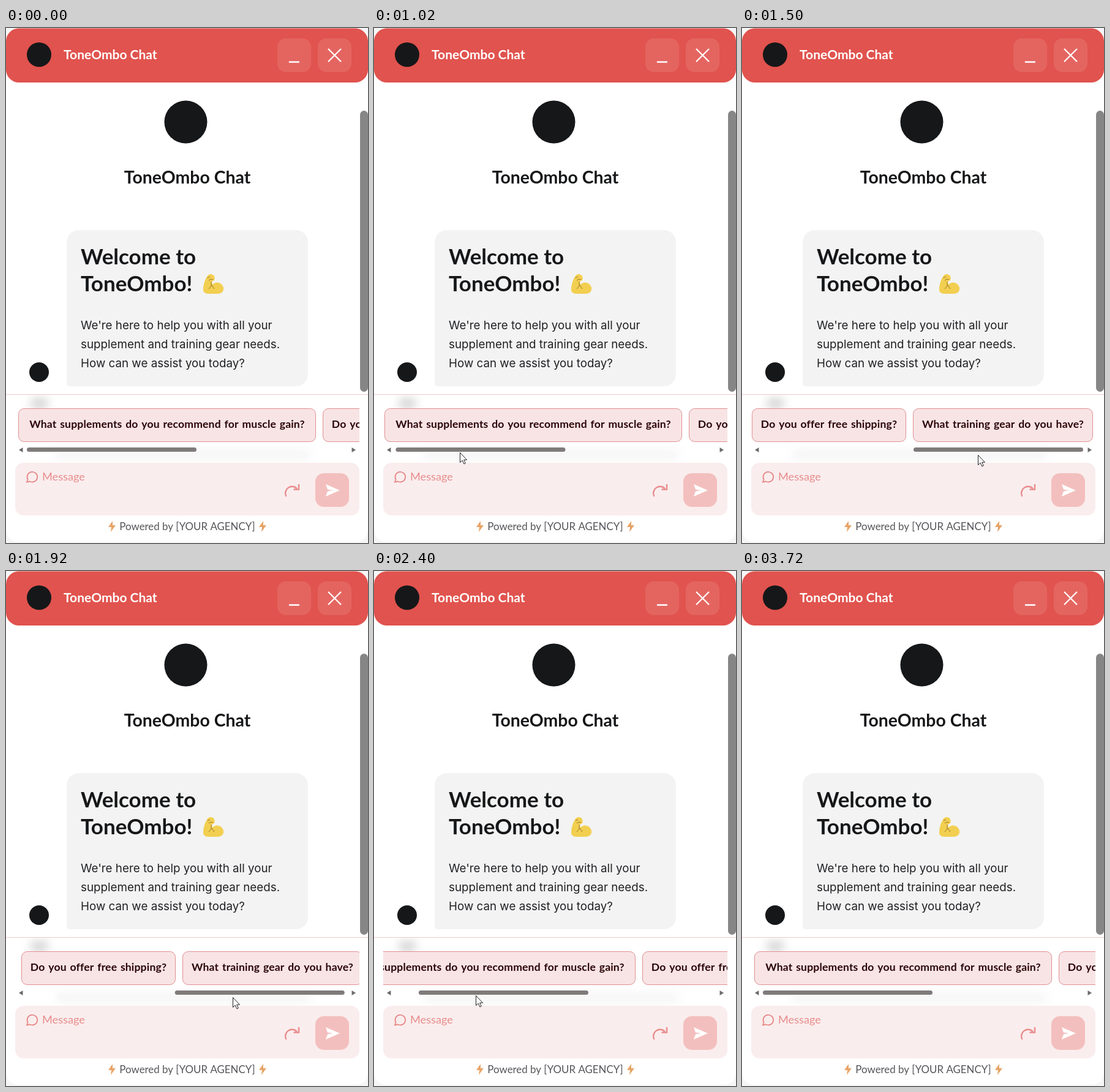
Animation of 591x841 px, one loop 4.02 s. Source, as an HTML page with a canvas:

```html
<!DOCTYPE html>
<html lang="en">
<head>
<meta charset="utf-8">
<title>Chat widget</title>
<style>
html, body { margin: 0; width: 100%; height: 100%; overflow: hidden; background: #f6f6f6; }
canvas { display: block; width: 591px; height: 841px; }
</style>
</head>
<body>
<canvas id="stage" width="591" height="841"></canvas>
<script>
const ctx = document.getElementById('stage').getContext('2d');
const LOOP = 4020, STEP = 60;
const RED = '#e1534e', INK = '#161719', ROSE = '#e88c8b';
const SCROLL_MAX = 501, THUMB_TRAVEL = 246;

const CHIPS = [
  { label: 'What supplements do you recommend for muscle gain?', width: 486 },
  { label: 'Do you offer free shipping?', width: 252 },
  { label: 'What training gear do you have?', width: 294 }
];

// Soft ease-in-out from 0 to 1 between two times
function glide(t, start, end) {
  const p = Math.min(1, Math.max(0, (t - start) / (end - start)));
  return (p + p * p * (3 - 2 * p)) / 2;
}

// Share of the list scrolled: dragged to the end, held, dragged back
const scrolled = t => glide(t, 1015, 1441) - glide(t, 1900, 2530);

function cursorAt(t) {
  const out = glide(t, 1015, 1441), back = glide(t, 1860, 2500);
  const away = 1 - glide(t, 600, 960) + glide(t, 3120, 3360);
  return {
    x: 138.5 + THUMB_TRAVEL * (out - back),
    y: 692.5 + 4 * (out - back) + 6 * Math.sin(Math.PI * out) + 24 * away
  };
}

function box(x, y, w, h, r, fill, stroke) {
  ctx.beginPath();
  ctx.roundRect(x, y, w, h, r);
  if (fill) { ctx.fillStyle = fill; ctx.fill(); }
  if (stroke) { ctx.strokeStyle = stroke; ctx.lineWidth = 1; ctx.stroke(); }
}

function text(str, x, y, size, color, { weight = 400, align = 'left', word = 0, letter = 0, font = 'Lato' } = {}) {
  ctx.font = `${weight} ${size}px ${font}, sans-serif`;
  ctx.textAlign = align;
  ctx.wordSpacing = word + 'px';
  ctx.letterSpacing = letter + 'px';
  ctx.fillStyle = color;
  ctx.fillText(str, x, y);
}

function disc(x, y, r, color) {
  ctx.beginPath();
  ctx.arc(x, y, r, 0, Math.PI * 2);
  ctx.fillStyle = color;
  ctx.fill();
}

function fillPath(d, color) {
  ctx.fillStyle = color;
  ctx.fill(new Path2D(d));
}

function strokePath(d, color, width) {
  ctx.strokeStyle = color;
  ctx.lineWidth = width;
  ctx.stroke(new Path2D(d));
}

function clipped(x, y, w, h, paint) {
  ctx.save();
  ctx.beginPath();
  ctx.rect(x, y, w, h);
  ctx.clip();
  paint();
  ctx.restore();
}

function drawHeader() {
  box(0, .5, 591, 88.5, 21, RED);
  disc(54, 43.5, 20, INK);
  text('ToneOmbo Chat', 94, 51, 21, '#fff', { weight: 700 });
  box(443, 17, 55, 55, 14, 'rgba(255,255,255,.1)');
  box(509, 17, 55, 55, 14, 'rgba(255,255,255,.1)');
  strokePath('M462 55.5H479M526 34L547 55M547 34L526 55', '#fff', 2.3);
}

function drawBiceps() {
  fillPath('M328 406Q332 400 338 403Q342 406 340 412L336 414L337 419Q343 413 350 417' +
    'Q356 421 355 428Q353 434 344 434H329Q321 433 322 425Q323 414 328 406Z', '#f2cf50');
  strokePath('M329 408L333 406M331 412L335 410L338 411M335 414L335 421M336 420L331 426M336 420L340 426', '#9a742c', 1);
}

function drawConversation() {
  disc(293.5, 153.5, 35, INK);
  text('ToneOmbo Chat', 296, 254, 28.4, INK, { weight: 700, align: 'center' });
  box(99, 330, 394, 255, [20, 20, 20, 5], '#f3f3f3');
  disc(54, 562, 16, INK);
  text('Welcome to', 122, 386, 35, INK, { weight: 700 });
  text('ToneOmbo!', 122, 430, 35, INK, { weight: 700 });
  drawBiceps();
  ["We're here to help you with all your", 'supplement and training gear needs.', 'How can we assist you today?']
    .forEach((line, i) => text(line, 122, 492 + 31 * i, 18.8, '#202124', { font: 'Inter' }));
  box(578, 135, 13, 459, 6.5, '#868686');
}

// Content blurred behind the footer panel
function drawFrosting() {
  ctx.filter = 'blur(8px)';
  box(40, 606, 29, 14, 7, 'rgba(70,75,70,.3)');
  box(80, 690, 418, 14, 7, 'rgba(90,90,90,.07)');
  ctx.filter = 'none';
}

function drawChips(progress) {
  clipped(15, 615, 562, 66, () => {
    let left = 20 - Math.round(SCROLL_MAX * progress);
    for (const { label, width } of CHIPS) {
      box(left + .5, 621.5, width - 1, 54, 9, '#f8e4e5', '#e18f92');
      text(label, left + width / 2, 653, 17.6, '#2b0508', { weight: 700, align: 'center', word: 1.3, letter: .15 });
      left += width + 11;
    }
  });
  box(34 + THUMB_TRAVEL * progress, 685, 277, 7, 3.5, '#807b7b');
  fillPath('M21 689L27.5 685V693ZM571 689L564.5 685V693Z', '#6e6a6a');
}

function drawFooter() {
  box(15, 710, 562, 86, 14, '#faedee');
  strokePath('M34 741.5L35.5 737A8.3 8.3 0 1 1 39 740.5Z', ROSE, 1.9);
  text('Message', 59, 739, 18.2, ROSE);
  strokePath('M457.5 765A11 11 0 0 1 475 752M478 745V753.5H469.5', ROSE, 2.4);
  box(505, 727, 55, 55, 14, '#f3bfbe');
  fillPath('M522 745L545 755L522 765L525 756.5L534 755L525 753.5Z', '#fff');
  for (const x of [173, 419]) {
    fillPath(`M${x + 1} 805L${x - 6} 815H${x - 1}L${x - 2} 823L${x + 6} 812H${x + 1}Z`, '#e8a467');
  }
  text('Powered by [YOUR AGENCY]', 296, 820, 16.9, '#55565a', { align: 'center' });
}

function drawCursor(t) {
  if (t < 600 || t >= 3400) return;
  const { x, y } = cursorAt(t);
  const arrow = 'M0 0V16L3.7 12.6L6.4 18.4L8.8 17.3L6.2 11.7H11Z';
  ctx.save();
  ctx.translate(Math.round(x) + .5, Math.round(y) + .5);
  fillPath(arrow, '#fff');
  strokePath(arrow, '#222', 1);
  ctx.restore();
}

function draw(t) {
  ctx.fillStyle = '#f6f6f6';
  ctx.fillRect(0, 0, 591, 841);
  box(0, 1, 591, 838, 20, '#fff');
  drawHeader();
  drawConversation();
  ctx.fillStyle = '#f2c9cc';
  ctx.fillRect(0, 598, 591, 1);
  clipped(0, 599, 591, 240, drawFrosting);
  drawChips(scrolled(t));
  drawFooter();
  drawCursor(t);
}

function tick(now) {
  draw(Math.floor(now % LOOP / STEP) * STEP);
  requestAnimationFrame(tick);
}
draw(0);
requestAnimationFrame(tick);
</script>
</body>
</html>
```
